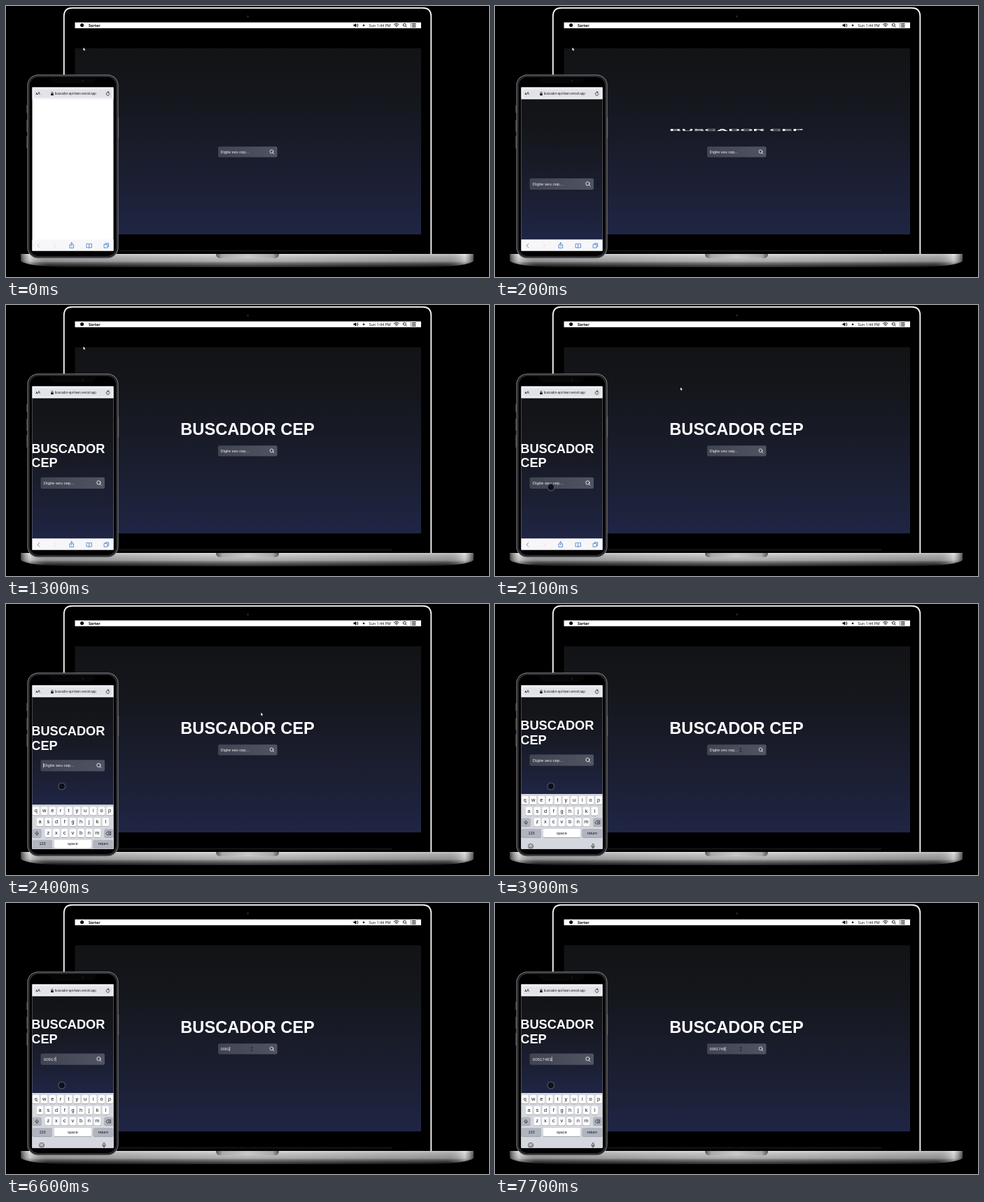
Animation of 690x388 px, one loop 8000 ms. Source, as an HTML page:

```html
<!DOCTYPE html>
<html lang="pt">
<head>
<meta charset="utf-8">
<title>Buscador CEP</title>
<style>
  html, body { margin: 0; width: 100%; height: 100%; overflow: hidden; background: #000; }
  svg { display: block; width: 690px; height: 388px; font-family: "Liberation Sans", Arial, sans-serif; }
  .menu { font-family: "Open Sans", sans-serif; font-size: 5.4px; }
  .title { font-weight: bold; fill: #fff; }
  .line { fill: none; stroke-linecap: round; stroke-linejoin: round; }
</style>
</head>
<body>
<svg viewBox="0 0 690 388">
  <defs>
    <linearGradient id="night" x2="0" y2="1">
      <stop stop-color="#121315"/><stop offset=".22" stop-color="#14161b"/>
      <stop offset=".6" stop-color="#1a1d2d"/><stop offset="1" stop-color="#1f2544"/>
    </linearGradient>
    <linearGradient id="metal" x2="0" y2="1">
      <stop stop-color="#e6e6e6"/><stop offset=".15" stop-color="#c4c4c4"/>
      <stop offset=".55" stop-color="#a2a2a2"/><stop offset=".68" stop-color="#666"/>
      <stop offset="1" stop-color="#0c0c0c"/>
    </linearGradient>
    <linearGradient id="shade">
      <stop stop-color="#000" stop-opacity=".6"/><stop offset=".02" stop-color="#fff" stop-opacity=".35"/>
      <stop offset=".06" stop-color="#000" stop-opacity=".12"/><stop offset=".5" stop-color="#fff" stop-opacity=".12"/>
      <stop offset=".94" stop-color="#000" stop-opacity=".12"/><stop offset=".98" stop-color="#fff" stop-opacity=".35"/>
      <stop offset="1" stop-color="#000" stop-opacity=".6"/>
    </linearGradient>
    <linearGradient id="notch">
      <stop stop-color="#555"/><stop offset=".1" stop-color="#aaa"/><stop offset=".5" stop-color="#c8c8c8"/>
      <stop offset=".9" stop-color="#aaa"/><stop offset="1" stop-color="#555"/>
    </linearGradient>
    <linearGradient id="field">
      <stop stop-color="#414452"/><stop offset="1" stop-color="#505361"/>
    </linearGradient>
    <clipPath id="screen"><path d="M37.5 116.5H153.5V350.5H37.5Z"/></clipPath>
  </defs>
  <rect width="690" height="388"/>

  <!-- laptop -->
  <path d="M82.8 356V15Q82.8 2.8 95 2.8H595Q607.3 2.8 607.3 15V356" fill="#000" stroke="#f2f2f2" stroke-width="1.9"/>
  <circle cx="345.5" cy="15" r="1.8" fill="#14161c"/>
  <circle cx="345.5" cy="15" r=".7" fill="#39404c"/>
  <path d="M161 350.5H552" stroke="#151515" stroke-width="2"/>
  <rect x="98.5" y="60.5" width="494.5" height="266.5" fill="url(#night)"/>
  <rect x="98.5" y="23.5" width="494.5" height="8.3" fill="#fff"/>
  <g class="menu">
    <circle cx="108.6" cy="27.6" r="2.5"/>
    <text x="118" y="29.6" font-weight="bold">Sorter</text>
    <path d="M496.5 26.6H498L500 25V30.4L498 28.8H496.5Z"/>
    <path class="line" d="M501 26.2Q502 27.7 501 29.2M502.3 25.3Q504 27.7 502.3 30.1" stroke="#000" stroke-width=".7"/>
    <circle cx="511" cy="27.7" r="1.3"/>
    <text x="518.5" y="29.6">Sun 1:44 PM</text>
    <path class="line" d="M554.5 26.4Q557.8 23.6 561.1 26.4M555.7 27.9Q557.8 26.1 559.9 27.9M557 29.3Q557.8 28.6 558.6 29.3" stroke="#000" stroke-width=".9"/>
    <path class="line" d="M571 28.7L572.3 30.1M567.3 27.1a2 2 0 1 0 4 0a2 2 0 1 0-4 0" stroke="#000" stroke-width=".8"/>
    <path d="M578 25.5H579M578 27.7H579M578 29.9H579M580 25.5H585.5M580 27.7H585.5M580 29.9H585.5" stroke="#000"/>
  </g>
  <g id="deskTitle"><text class="title" y="8.4" font-size="23.6" text-anchor="middle">BUSCADOR CEP</text></g>
  <rect x="303" y="201.2" width="84.5" height="15.3" rx="2" fill="url(#field)"/>
  <g class="line" stroke="#f4f4f6" stroke-width=".8"><circle cx="379.4" cy="208.4" r="2.4"/><path d="M381.2 210.2L382.8 211.8"/></g>
  <text id="deskText" x="306.6" y="211" font-size="5.65" fill="#eee"></text>
  <path id="deskCaret" d="M0 206V212" stroke="#fff" stroke-width=".7"/>
  <path id="arrow" d="M-1 -2L2 1L.6 1.1L1.2 2.4L.4 2.7L-.2 1.4L-1 2Z" fill="#fff"/>
  <path id="beam" class="line" d="M350 206.5H352M351 206.5V211.5M350 211.5H352" stroke="#16181f" stroke-width=".6"/>
  <g id="base">
    <path id="slab" d="M21.5 355H668V365Q660 373 600 374H90Q29 373 21.5 365Z" fill="url(#metal)"/>
    <path d="M21.5 355H668V365Q660 373 600 374H90Q29 373 21.5 365Z" fill="url(#shade)"/>
    <path d="M300 355H390Q390 361.3 383 361.3H307Q300 361.3 300 355Z" fill="url(#notch)"/>
  </g>

  <!-- phone -->
  <path d="M30 142V153M30 163V180M30 186V204M160.6 160V189" stroke="#555" stroke-width="1.2"/>
  <rect x="31" y="98.8" width="129" height="262" rx="15" fill="#09090b" stroke="#77787c" stroke-width="1.2"/>
  <rect x="33" y="100.8" width="125" height="258" rx="13.5" fill="#000" stroke="#303136" stroke-width="1.5"/>
  <path d="M62 102.5H129Q127 111 120 111H71Q64 111 62 102.5Z" fill="#060607"/>
  <circle cx="110" cy="107" r="1.3" fill="#15192a"/>
  <g clip-path="url(#screen)">
    <rect x="37" y="116" width="117" height="235" fill="#fff"/>
    <g id="page">
      <rect id="pageBack" x="37" y="133" width="117" fill="url(#night)"/>
      <g id="content">
        <g id="phoneTitle" class="title" font-size="18.2">
          <text x="36.3" y="-4">BUSCADOR</text><text x="36.3" y="16.8">CEP</text>
        </g>
        <rect x="49.5" y="246.8" width="91.5" height="16.2" rx="2" fill="url(#field)"/>
        <g class="line" stroke="#f4f4f6" stroke-width=".9"><circle cx="132.4" cy="254.3" r="2.6"/><path d="M134.4 256.3L136.1 258"/></g>
        <text id="phoneText" x="53.8" y="256.9" font-size="6.07" fill="#eee"></text>
        <path id="phoneCaret" d="M0 251.5V258" stroke="#fff" stroke-width=".7"/>
      </g>
    </g>
    <circle id="touch" cx="79.8" cy="261" r="4.9" fill="#0d0f19" stroke="#4b4e5b" stroke-width="1.3"/>
    <rect x="37" y="116" width="117" height="17.5" fill="#eeeff3"/>
    <rect x="40" y="119.5" width="111" height="11.5" rx="2.5" fill="#e2e3e8"/>
    <text x="42.5" y="127.4" font-size="4">A<tspan font-size="5.4">A</tspan></text>
    <path d="M64.3 125.2H67.7V128H64.3Z"/>
    <path class="line" d="M65 125V124.2a1 1 0 0 1 2 0V125" stroke="#000" stroke-width=".6"/>
    <text x="69.8" y="127.3" font-size="4.5" fill="#222">buscador-api-fawn.vercel.app</text>
    <path class="line" d="M147.3 124A2.4 2.4 0 1 0 148 125.8M145.4 122.3L147.2 123.7L145.6 125" stroke="#111" stroke-width=".7"/>
    <rect x="37" y="334.5" width="117" height="17" fill="#f7f7fa"/>
    <g class="line" stroke="#3d78c4" stroke-width=".8">
      <path id="back" d="M47.8 340.3L45 343.1L47.8 345.9"/>
      <path d="M69 340.3L71.8 343.1L69 345.9" stroke="#dcdde2"/>
      <path d="M92.6 341.8H91V346.4H96.6V341.8H95M93.8 344V338.8M92.2 340.2L93.8 338.7L95.4 340.2"/>
      <path d="M118.7 341.1Q116.8 339.7 115 340.5V346Q117 345.4 118.7 346.4Q120.4 345.4 122.4 346V340.5Q120.6 339.7 118.7 341.1V346.3"/>
      <path d="M140.4 341.4H145V346.2H140.4ZM142 341V339.8H146.6V344.6H145.4"/>
    </g>
    <g id="keyboard" text-anchor="middle">
      <rect x="37" y="272" width="117" height="80" fill="#d5d7de"/>
      <g id="keys"></g>
      <g class="line" stroke="#222" stroke-width=".7">
        <path d="M44.3 310.4L46.4 313H45.2V315H43.4V313H42.2Z"/>
        <path d="M143 312.7L145 310.4H149.6V315H145ZM146.2 311.7L148.3 313.8M148.3 311.7L146.2 313.8"/>
        <circle cx="51" cy="346.8" r="3.5"/>
        <path d="M49.2 347.8Q51 349.8 52.8 347.8M49.8 345.7V346M52.2 345.7V346"/>
        <path d="M138.9 344.4a1.1 1.1 0 0 1 2.2 0V346.6a1.1 1.1 0 0 1-2.2 0ZM137.7 346.5Q138 349 140 349T142.3 346.5M140 349V350.5"/>
      </g>
    </g>
  </g>
</svg>
<script>
const LOOP = 8000, CODE = "00917483", HINT = "Digite seu cep...";
const PHONE_KEYS = [4400, 5200, 5500, 5900, 6300, 6900, 7100, 7400];
const DESK_KEYS = [5200, 5500, 6300, 6600, 7000, 7400, 7700];
const $ = id => document.getElementById(id);
const clamp = v => Math.max(0, Math.min(1, v));
const progress = (t, from, to) => clamp((t - from) / (to - from));
const ease = p => p * p * (3 - 2 * p);
const mix = (a, b, p) => a + (b - a) * p;
const show = (id, on) => $(id).style.display = on ? "" : "none";
const move = (id, x, y, sy = 1) => $(id).setAttribute("transform", `translate(${x} ${y}) scale(1 ${sy})`);

function key(x, y, w, label, size, fill = "#fff") {
  return `<rect x="${x}" y="${y + .9}" width="${w}" height="11.8" rx="1.8" fill="#93969f"/>
    <rect x="${x}" y="${y}" width="${w}" height="12" rx="1.8" fill="${fill}"/>
    <text x="${x + w / 2}" y="${y + (size > 6 ? 7.9 : 7.8)}" font-size="${size}" fill="#111">${label}</text>`;
}

function buildKeys() {
  const rows = [["qwertyuiop", 38], ["asdfghjkl", 43.8], ["zxcvbnm", 55.4]];
  const letters = rows.flatMap(([row, x], r) =>
    [...row].map((c, i) => key(x + i * 11.7, 275 + r * 15.7, 9.7, c, 7.4)));
  const gray = "#b0b4bf";
  $("keys").innerHTML = letters.join("") +
    key(38, 306.4, 12.5, "", 6, gray) + key(140.5, 306.4, 12.5, "", 6, gray) +
    key(38, 322.1, 28, "123", 5.5, gray) + key(68.6, 322.1, 53.6, "space", 5.5) +
    key(124.6, 322.1, 28.4, "return", 5.5, gray);
}

function drawInput(name, t, times, x, digitWidth, caretOn) {
  const count = times.filter(at => t >= at).length;
  $(name + "Text").textContent = CODE.slice(0, count) || HINT;
  move(name + "Caret", x + count * digitWidth + (count ? .4 : -.2), 0);
  show(name + "Caret", caretOn);
}

function draw(t) {
  // Titles unfold vertically once the page has loaded.
  const deskFold = progress(t, 100, 814), phoneFold = progress(t, 260, 910);
  show("deskTitle", deskFold > 0);
  move("deskTitle", 345, 178, deskFold);
  show("page", t >= 200);
  show("phoneTitle", phoneFold > 0);
  move("phoneTitle", 0, 215.5, phoneFold);
  $("back").style.stroke = t < 100 ? "#b9c4d4" : "";

  // The keyboard shrinks the page, whose content stays centred.
  const rise = 1 - (1 - progress(t, 2150, 2750)) ** 3;
  const top = 351 - 79 * rise, bottom = Math.min(334.5, top);
  move("keyboard", 0, top - 272);
  $("pageBack").setAttribute("height", bottom - 133);
  move("content", 0, (bottom - 334.5) / 2);
  show("touch", t >= 2000);

  const across = ease(progress(t, 1700, 2400)), down = ease(progress(t, 2450, 2900));
  const y = mix(mix(61.5, 157.5, across), 209, down);
  move("arrow", mix(mix(111.5, 365.3, across), 351, down), y);
  show("arrow", y < 201);
  show("beam", y >= 201);

  drawInput("phone", t, PHONE_KEYS, 53.8, 3.375, t >= 2200 && t < 3900 || t >= 4400 && t < 4700 || t >= 5200);
  drawInput("desk", t, DESK_KEYS, 306.6, 3.142, t >= 4100 && t < 4700 || t >= 5200);
}

function tick() {
  draw(performance.now() % LOOP);
  requestAnimationFrame(tick);
}
buildKeys();
tick();
</script>
</body>
</html>
```
